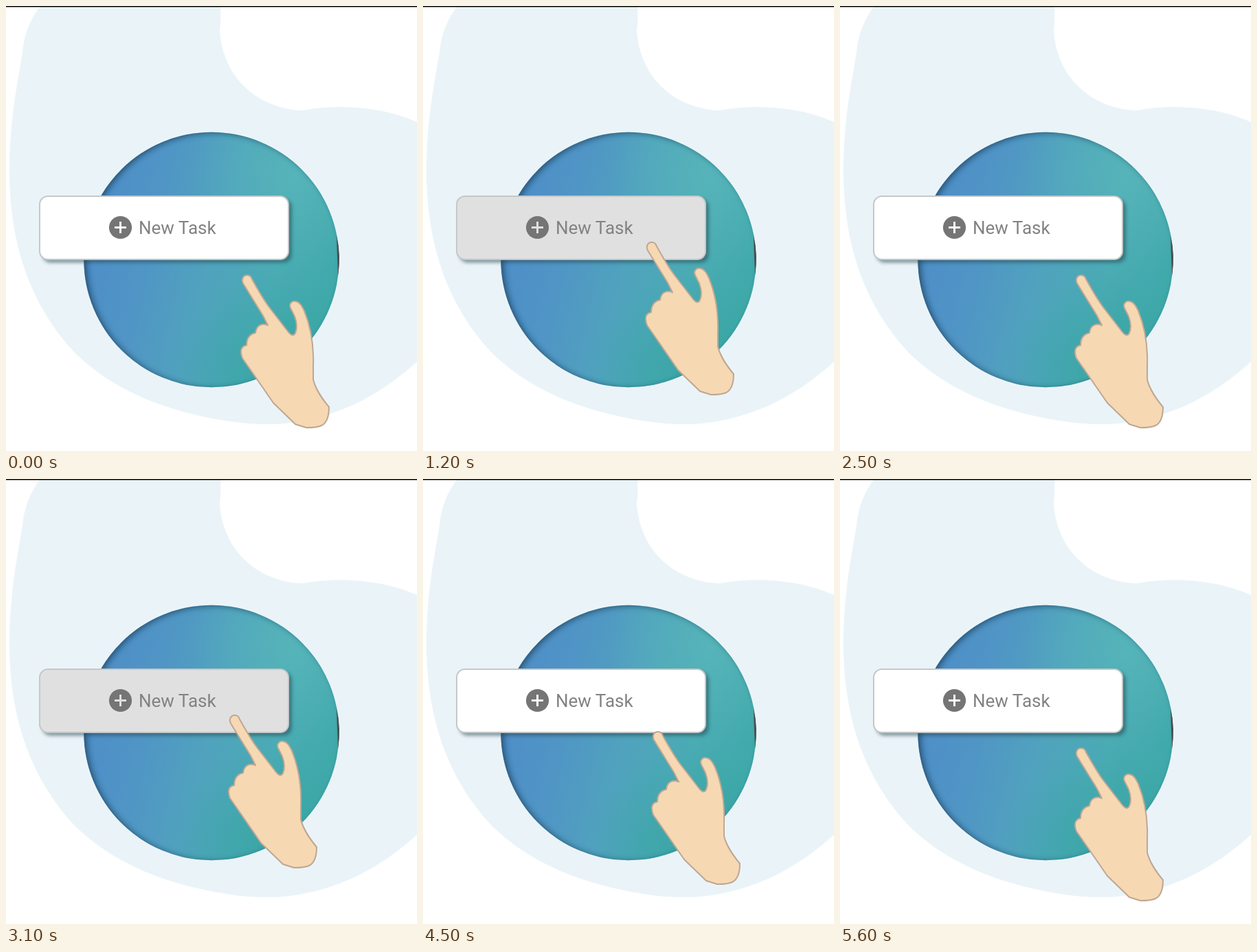
Write an HTML page that moves like this. It is 598 px wide and 648 px high and loops after 5700 ms.

```html
<!DOCTYPE html>
<html lang="en">
<head>
<meta charset="utf-8">
<title>New Task button</title>
<style>
  html, body { margin: 0; width: 100%; height: 100%; overflow: hidden; background: #fff; }
  svg { display: block; width: 598px; height: 648px; }
  text { font: 26px Roboto, sans-serif; fill: #828282; }
</style>
</head>
<body>
<svg viewBox="0 0 598 648">
  <defs>
    <linearGradient id="sea" gradientUnits="userSpaceOnUse" x1="122" y1="335" x2="478" y2="415">
      <stop offset="0" stop-color="#4e8ec8"/>
      <stop offset=".25" stop-color="#5096c5"/>
      <stop offset=".5" stop-color="#50a3bd"/>
      <stop offset=".75" stop-color="#4aabb4"/>
      <stop offset="1" stop-color="#3fa9a9"/>
    </linearGradient>
    <radialGradient id="glow" gradientUnits="userSpaceOnUse" cx="420" cy="245" r="150">
      <stop offset="0" stop-color="#5ab8bb" stop-opacity=".7"/>
      <stop offset="1" stop-color="#5ab8bb" stop-opacity="0"/>
    </radialGradient>
    <radialGradient id="deep" gradientUnits="userSpaceOnUse" cx="390" cy="540" r="150">
      <stop offset="0" stop-color="#36a4a2" stop-opacity=".8"/>
      <stop offset="1" stop-color="#36a4a2" stop-opacity="0"/>
    </radialGradient>
    <clipPath id="disc"><circle cx="299" cy="369.5" r="185.7"/></clipPath>
    <filter id="soft" x="-20%" y="-20%" width="140%" height="140%"><feGaussianBlur stdDeviation="4"/></filter>
    <filter id="softer" x="-10%" y="-30%" width="120%" height="160%"><feGaussianBlur stdDeviation="2.5"/></filter>
  </defs>

  <path fill="#eaf4f8" d="M50 0C36 17 26 42 24 68C15 120 6 165 5 235C4 340 32 432 100 505C154 558 230 590 320 604C350 609 380 610 405 608C480 600 542 569 598 518V169C545 145 480 143 432 152C370 150 316 108 311 36Q313 20 312 0Z"/>
  <path fill="#000" d="M0 0H598V1.6H0Z"/>

  <g clip-path="url(#disc)">
    <path fill="url(#sea)" d="M110 180H490V560H110Z"/>
    <path fill="url(#glow)" d="M110 180H490V560H110Z"/>
    <path fill="url(#deep)" d="M110 180H490V560H110Z"/>
    <circle cx="303.5" cy="371" r="206" fill="none" stroke="#1d3f58" stroke-opacity=".72" stroke-width="40" filter="url(#soft)"/>
    <path fill="url(#deep)" d="M400 400H490V560H400Z" opacity=".3"/>
  </g>
  <path fill="#4a4b50" d="M481 334Q487.6 362 483.2 392Q481.6 362 481 334Z"/>

  <rect x="53" y="281" width="363" height="93" rx="12" fill="#25404a" fill-opacity=".5" filter="url(#softer)"/>
  <rect id="button" x="49" y="277" width="362" height="92" rx="12" stroke="#c5c7c8" stroke-width="2"/>
  <circle cx="166.5" cy="322.5" r="16.6" fill="#757575"/>
  <path id="plus" d="M158 322.5H175M166.5 314V331" stroke-width="3"/>
  <text x="193" y="332">New Task</text>

  <path id="hand" fill="#f6d8b3" stroke="#bda794" stroke-width="2" stroke-linejoin="round"
    d="M345 404C342 398 345 392 351 392C355 392 357 395 358 398C366 412 374 427 384 440L411 475C415 480 419 481 421 476C424 469 423 460 420 452L414 440C411 434 416 429 421 430C428 431 431 438 434 444C443 466 448 495 447 524V544C451 560 461 573 470 584C470 596 467 607 459 611C453 614 446 614 437 614L421 609L389 578L360 536L344 513C341 505 340 496 350 494C350 485 354 478 363 476C364 466 371 461 381 465L374 451Z"/>
</svg>
<script>
  const LOOP = 5700, STEP = 100, MOVE = 200;
  // Each click, in ms: the hand starts up, the button turns grey, the hand starts back.
  const clicks = [
    { rise: 500, press: 1100, release: 1900 },
    { rise: 2600, press: 3100, release: 3700 },
    { rise: 4400, press: 4800, release: 5400 }
  ];
  const [button, plus, hand] = ["button", "plus", "hand"].map(id => document.getElementById(id));
  const ramp = (time, start) => Math.min(1, Math.max(0, (time - start) / MOVE));

  function draw(time) {
    let lift = 0, pressed = false;
    for (const { rise, press, release } of clicks) {
      lift += ramp(time, rise) - ramp(time, release);
      pressed ||= time >= press && time <= release;
    }
    const face = pressed ? "#e0e0e0" : "#fff";
    button.setAttribute("fill", face);
    plus.setAttribute("stroke", face);
    hand.setAttribute("transform", `translate(${-18 * lift} ${-48 * lift})`);
  }

  const begin = performance.now();
  function tick() {
    const time = (performance.now() - begin) % LOOP;
    draw(Math.floor(time / STEP) * STEP);
    requestAnimationFrame(tick);
  }
  tick();
</script>
</body>
</html>
```
